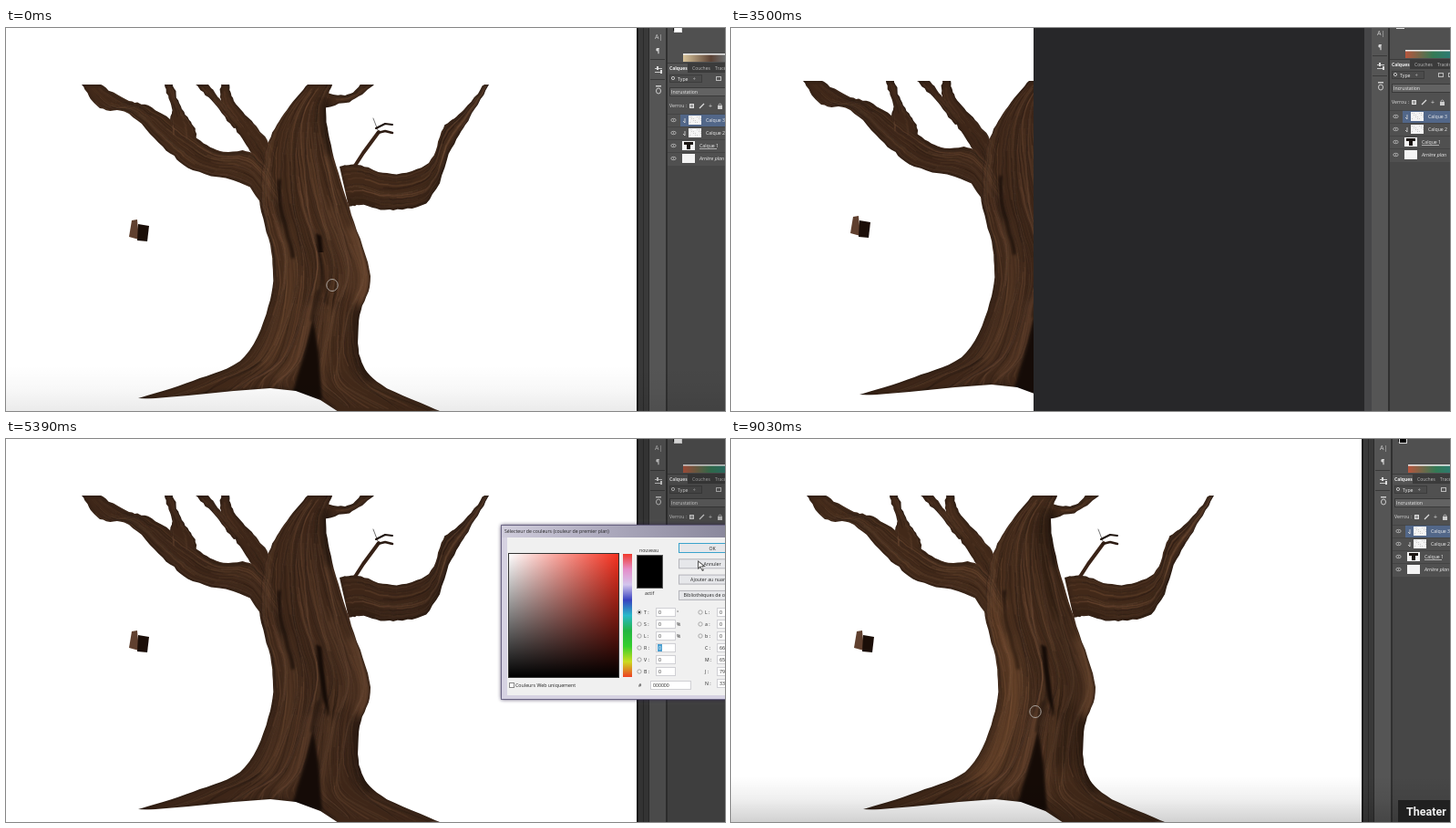
Recreate the animation shown at these times as an HTML page with a canvas. Size 789x420 px, loop 9100 ms.

```html
<!DOCTYPE html>
<html lang="fr">
<head>
<meta charset="utf-8">
<title>Peinture d'un arbre</title>
<style>
html, body { margin: 0; width: 100%; height: 100%; overflow: hidden; background: #fff; }
canvas { display: block; width: 789px; height: 420px; }
</style>
</head>
<body>
<canvas id="stage" width="789" height="420"></canvas>
<script>
const W = 789, H = 420, LOOP = 9100, STEP = 70;
const ctx = document.getElementById('stage').getContext('2d');

const layer = () => {
  const c = document.createElement('canvas');
  c.width = W; c.height = H;
  return c.getContext('2d');
};
const lerp = (a, b, k) => a + (b - a) * k;
const ramp = (t, a, b) => Math.min(1, Math.max(0, (t - a) / (b - a)));
const pairs = s => s.split(' ').map(p => p.split(',').map(Number));

let seed = 11;
const rnd = () => {
  seed = (seed * 16807) % 2147483647;
  return seed / 2147483647;
};

// Smooth curve through key points, with a slightly rough bark edge.
function edge(s, rough = 1.1) {
  const p = pairs(s), last = p.length - 1, out = [], n = 8;
  for (let i = 0; i < last; i++) {
    const q = [p[Math.max(0, i - 1)], p[i], p[i + 1], p[Math.min(last, i + 2)]];
    for (let j = 0; j < n; j++) {
      const u = j / n;
      const jitter = i + j && j % 2 ? rough : 0;
      out.push([0, 1].map(d => {
        const [a, b, c, e] = q.map(v => v[d]);
        const v = b + 0.5 * u * (c - a + u * (2 * a - 5 * b + 4 * c - e + u * (3 * (b - c) + e - a)));
        return v + (rnd() - 0.5) * 2 * jitter;
      }));
    }
  }
  return [...out, p[last]];
}

// A limb lies between two edges.
const limb = (a, b, rough) => ({ a: edge(a, rough), b: edge(b, rough) });

const trunk = limb(
  '331,62 305,94 287,130 278,187 291,245 290,298 262,360 205,387 145,406',
  '358,62 351,88 358,135 379,205 400,272 388,315 389,362 412,391 476,420', 0.6);
const leftArm = limb(
  '104,62 135,80 160,87 205,118 235,135 273,139 305,185',
  '83,62 103,88 135,94 172,130 205,156 262,172 287,205');
const rightArm = limb(
  '366,152 385,150 424,160 464,148 480,110 500,92 525,62',
  '376,196 390,194 425,200 465,188 489,132 509,98 530,62');
const twigs = [
  limb('183,62 192,86 206,108 210,125', '174,62 182,88 180,100 182,116'),
  limb('222,62 240,84 262,108', '208,62 228,82 250,110'),
  limb('245,62 250,80 272,105 290,128 298,150', '236,62 236,82 252,110 270,138 280,155'),
  limb('404,62 380,79 345,89', '390,62 372,74 340,68')
];

function line(g, pts, color, width, alpha = 1) {
  g.globalAlpha = alpha;
  g.strokeStyle = color;
  g.lineWidth = width;
  g.beginPath();
  pts.forEach(p => g.lineTo(...p));
  g.stroke();
  g.globalAlpha = 1;
}

function poly(g, pts, color) {
  g.fillStyle = color;
  g.beginPath();
  (typeof pts === 'string' ? pairs(pts) : pts).forEach(p => g.lineTo(...p));
  g.closePath();
  g.fill();
}

const fillLimb = (g, { a, b }) => poly(g, [...a, ...[...b].reverse()], '#422919');

// Stroke along a limb at share u of its width, from one share of its length to another.
function seam(g, { a, b }, u, from, to, color, width, alpha, drift = 0) {
  const n = a.length - 1, pts = [];
  for (let j = Math.floor(from * n); j <= Math.min(1, to) * n; j++) {
    const k = u + drift * Math.sin(j * 0.3 + u * 40);
    pts.push([lerp(a[j][0], b[j][0], k), lerp(a[j][1], b[j][1], k)]);
  }
  line(g, pts, color, width, alpha);
}

function grain(g, target, count) {
  const tones = ['#1a0e07', '#7b5034', '#2b190f', '#64412a'];
  for (let i = 0; i < count; i++) {
    const from = rnd() * 0.85;
    seam(g, target, rnd(), from, from + 0.12 + rnd() * 0.4, tones[i % 4],
      0.5 + rnd() * 1.3, 0.08 + rnd() * 0.22, rnd() * 0.03);
  }
}

function soft(g, blur, draw) {
  g.filter = `blur(${blur}px)`;
  draw();
  g.filter = 'none';
}

function paintTree() {
  const g = layer();
  g.lineCap = g.lineJoin = 'round';
  const limbs = [leftArm, rightArm, ...twigs, trunk];
  limbs.forEach(l => fillLimb(g, l));
  poly(g, '300,405 365,421 476,420', '#422919');
  g.globalCompositeOperation = 'destination-out';
  poly(g, '140,408 200,403 250,398 290,395 318,398 345,408 365,421 140,421', '#000');

  const hole = layer();
  hole.fillRect(0, 0, W, H);
  hole.globalCompositeOperation = 'destination-out';
  hole.drawImage(g.canvas, 0, 0);

  g.globalCompositeOperation = 'source-atop';
  limbs.forEach(l => grain(g, l, l === trunk ? 420 : twigs.includes(l) ? 30 : 120));

  const dark = '#150b06', light = '#82573b';
  soft(g, 4, () => {
    seam(g, trunk, 0.96, 0.1, 0.26, dark, 9, 0.65);
    seam(g, trunk, 0.97, 0.62, 0.85, dark, 9, 0.6);
    seam(g, trunk, 0.95, 0.42, 0.58, light, 7, 0.7);
    seam(g, trunk, 0.8, 0.38, 0.55, light, 14, 0.22);
    seam(g, trunk, 0.44, 0.64, 0.87, light, 6, 0.55);
    seam(g, trunk, 0.68, 0.64, 0.9, light, 6, 0.45);
    seam(g, trunk, 0.2, 0.45, 0.78, light, 12, 0.25);
    seam(g, rightArm, 0.85, 0, 0.6, dark, 8, 0.4);
  });
  soft(g, 1.5, () => {
    seam(g, trunk, 0.22, 0.33, 0.5, dark, 4, 0.8);
    poly(g, '337,320 343,355 347,408 314,401 328,355', dark);
    seam(g, trunk, 0.49, 0.58, 0.66, dark, 3, 0.6);
  });
  g.globalAlpha = 0.5;
  soft(g, 2.5, () => g.drawImage(hole.canvas, 0, 0));
  g.globalAlpha = 1;

  g.globalCompositeOperation = 'source-over';
  line(g, pairs('383,151 392,137 409,114'), '#3a2317', 4);
  line(g, pairs('408,115 416,113 424,115'), '#2c1b12', 2.5);
  line(g, pairs('408,112 403,99'), '#777', 1);
  line(g, pairs('406,110 416,105 424,106'), '#20150f', 2);
  return g.canvas;
}

const tree = paintTree();
const work = layer();

function drawTree(t) {
  const g = work;
  g.globalCompositeOperation = 'source-over';
  g.clearRect(0, 0, W, H);
  g.drawImage(tree, 0, 0);
  g.globalCompositeOperation = 'source-atop';
  const dim = 0.1 * ramp(t, 1750, 2660) * (1 - ramp(t, 6440, 6720));
  g.fillStyle = `rgba(20,12,9,${dim})`;
  g.fillRect(0, 0, W, H);

  const glow = ramp(t, 6440, 6790), shade = ramp(t, 7420, 8330);
  if (glow) soft(g, 7, () => seam(g, trunk, 0.15, 0.35, 0.8, '#8a5836', 17, 0.33 * glow));
  if (shade) soft(g, 8, () => seam(g, trunk, 0.8, 0.1, 0.75, '#160b05', 24, 0.3 * shade));

  // The knothole is painted downwards.
  g.save();
  g.beginPath();
  g.rect(330, 220, 40, lerp(26, 90, ramp(t, 70, 1400)));
  g.clip();
  soft(g, 1, () => poly(g, '340,225 346,228 355,304 348,285', '#150b06'));
  g.restore();
  soft(g, 1.5, () => line(g, pairs('344,245 353,304'), '#150b06', 3, 0.4));
  ctx.drawImage(g.canvas, 0, 0);
}

function rect(x, y, w, h, color) {
  ctx.fillStyle = color;
  ctx.fillRect(x, y, w, h);
}

function box(x, y, w, h, fill, border) {
  rect(x, y, w, h, border);
  rect(x + 1, y + 1, w - 2, h - 2, fill);
}

function text(s, x, y, color = '#222', size = 5.2, style = '') {
  ctx.font = `${style} ${size}px "Open Sans", sans-serif`;
  ctx.fillStyle = color;
  ctx.fillText(s, x, y);
}

function ring(x, y, rx, ry, color, width = 0.8) {
  ctx.strokeStyle = color;
  ctx.lineWidth = width;
  ctx.beginPath();
  ctx.ellipse(x, y, rx, ry, 0, 0, Math.PI * 2);
  ctx.stroke();
}

function fade(x, y, w, h, stops, down) {
  const f = ctx.createLinearGradient(x, y, down ? x : x + w, down ? y + h : y);
  stops.forEach((c, i) => f.addColorStop(i / (stops.length - 1), c));
  rect(x, y, w, h, f);
}

function swatches() {
  poly(ctx, '138,211 144,210 146,232 135,229', '#60402f');
  poly(ctx, '145,215 157,217 155,234 144,233', '#1b0e08');
}

function layerRow(y, name, kind) {
  const inset = kind === 'clip' ? 7 : 0, x = 17 + inset;
  ring(7.5, y, 2.7, 1.7, '#ccc', 0.7);
  rect(7, y - 0.5, 1, 1, '#ddd');
  rect(x, y - 5, 14, 10, '#f4f4f4');
  if (inset) {
    line(ctx, [[20, y - 2], [20, y + 3], [18, y + 1]], '#ddd', 0.8);
    for (let i = 0; i < 14; i++) rect(x + 1 + i % 7 * 2, y - 4 + (i % 4) * 2, 1, 1, '#ccc');
  }
  if (kind === 'tree') {
    rect(x + 2, y - 4, 10, 3, '#1a1512');
    rect(x + 5, y - 2, 4, 6, '#1a1512');
    rect(x + 19, y + 3, 19, 0.6, '#eee');
  }
  text(name, x + 19, y + 2, '#f0f0f0', 5.2, kind === 'back' ? 'italic' : '');
}

function toolStrip() {
  text('A|', -13, 12, '#ccc', 7);
  text('¶', -12, 27, '#ddd', 7, 'bold');
  for (let i = 0; i < 2; i++) {
    rect(-18, 34 + i * 22, 16, 0.8, '#333');
    rect(-13, 44 + i * 4, 8, 1, '#ccc');
    rect(-11 + i * 4, 42 + i * 4, 2, 4, '#ddd');
  }
  ring(-9, 69, 2.5, 3, '#ccc', 1);
  rect(-12, 63, 6, 1.5, '#ccc');
}

function dock(x, y, t) {
  ctx.save();
  ctx.translate(x, 0);
  rect(-19, 0, 18, H, '#555');
  rect(-1, 0, 2, H, '#303030');
  rect(1, 0, 121, H, '#474747');
  ctx.translate(0, y);
  toolStrip();

  rect(1, -4, 121, 42, '#505050');
  rect(7, -2, 5, 5, '#111');
  box(8, -3, 9, 8, t < 6230 ? '#fff' : '#000', '#ddd');
  fade(18, 29, 92, 8, t < 980 ? ['#d9c49a', '#5c4336', '#7d9aa8', '#b15b44'] : ['#b8553d', '#347a55', '#267a86', '#c0675b']);
  rect(18, 28, 92, 1.5, '#eee');
  rect(1, 38, 121, 11, '#3b3b3b');
  rect(1, 39, 22, 10, '#535353');
  ['Calques', 'Couches', 'Tracés'].forEach((s, i) =>
    text(s, 3 + i * 25, 46, i ? '#bbb' : '#f2f2f2', 5, i ? '' : 'bold'));

  rect(1, 49, 121, 102, '#505050');
  box(3, 51, 36, 9, '#4b4b4b', '#3d3d3d');
  ring(7, 55, 1.6, 1.6, '#ddd');
  text('Type    ÷', 12, 57.5, '#eee');
  for (let i = 0; i < 5; i++) box(54 + i * 11, 53, 6, 5, '#555', '#bbb');
  box(3, 65, 71, 10, '#626262', '#3a3a3a');
  text('Incrustation', 5, 72, '#f0f0f0');
  text('Verrou :', 3, 87, '#ddd');
  ['Opacité :', 'Fond :'].forEach((s, i) => {
    const v = 65 + i * 15;
    text(s, 77 + i * 5, v + 7, '#ddd');
    box(97, v, 16, 9, '#393939', '#2d2d2d');
    text('100 %', 99, v + 6.5, '#eee', 4.8);
    box(114, v, 7, 9, '#606060', '#3a3a3a');
  });
  box(25, 83, 5, 5, '#999', '#ddd');
  line(ctx, [[36, 88], [41, 83]], '#ddd', 1.2);
  text('+', 46, 88, '#ddd', 7);
  rect(56, 85, 5, 4, '#ccc');
  ring(58.5, 85, 1.5, 2, '#ccc');

  rect(15, 94, 107, 14, '#526789');
  ['Calque 3', 'Calque 2', 'Calque 1', 'Arrière plan'].forEach((s, i) => {
    rect(1, 94 + i * 14, 121, 0.8, '#414141');
    layerRow(101 + i * 14, s, ['clip', 'clip', 'tree', 'back'][i]);
  });
  box(109, 140, 5, 5, '#777', '#bbb');
  ctx.restore();
}

function rails() {
  rect(692, 0, 14, H, '#393939');
  rect(692, 0, 2, H, '#1c1c1c');
  rect(699, 0, 1, H, '#2a2a2a');
  rect(705, 0, 1, H, '#2a2a2a');
}

function paper(t) {
  rect(0, 0, W, H, '#fff');
  drawTree(t);
  swatches();
}

function field(label, value, x, y, width, selected) {
  text(label, x, y + 2);
  box(x + 13, y - 5, width, 10, '#fff', '#d0d0d4');
  if (selected) rect(x + 15, y - 4, 5, 8, '#4b9fd0');
  text(value, x + 16, y + 2, selected ? '#fff' : '#222');
}

function dialog() {
  rect(692, 0, 97, H, 'rgba(25,25,25,.18)');
  ctx.save();
  ctx.shadowColor = 'rgba(40,30,70,.5)';
  ctx.shadowBlur = 4;
  box(543, 94, 260, 192, '#d6d2e2', '#77728f');
  ctx.restore();
  fade(544, 95, 245, 13, ['#d0cddc', '#aaa7bb', '#8a889c']);
  text('Sélecteur de couleurs (couleur de premier plan)', 547, 103);
  rect(550, 108, 239, 173, '#f0f0f0');

  rect(551, 125, 122, 137, '#333');
  fade(552, 126, 120, 135, ['#fff', '#f5301e']);
  fade(552, 126, 120, 135, ['rgba(0,0,0,0)', '#000'], true);
  fade(677, 126, 10, 135, ['#f03a2c', '#e58dc9', '#d3c5ed', '#3842c0', '#28b9c9', '#23b542', '#34cf2d', '#cbdc20', '#ee3f24'], true);
  text('nouveau', 695, 124);
  box(692, 127, 29, 37, '#000', '#555');
  text('actif', 701, 171);

  ['OK', 'Annuler', 'Ajouter au nuancier', 'Bibliothèques de couleurs'].forEach((s, i) => {
    const y = 114 + i * 17.3;
    box(738, y, 74, 11, '#e6e7ea', i ? '#b4b4ba' : '#3aa3cc');
    ctx.textAlign = 'center';
    text(s, 775, y + 7.5);
    ctx.textAlign = 'left';
  });
  for (let i = 0; i < 6; i++) {
    const y = 190 + i * 13;
    ring(695, y, 2.2, 2.2, '#999');
    field('TSLRVB'[i] + ' :', '0', 700, y, 22, i === 3);
    if (i < 3) {
      text('°%%'[i], 736, y + 2);
      ring(762, y, 2.2, 2.2, '#999');
    }
    field('LabCMJ'[i] + ' :', i < 3 ? '0' : ['66', '65', '79'][i - 3], 767, y, 22);
  }
  rect(694, 189, 2, 2, '#222');
  field('N :', '33', 767, 268, 22);
  box(552, 267, 6, 6, '#fff', '#888');
  text('Couleurs Web uniquement', 559, 272, '#222', 5.3);
  field('#', '000000', 694, 270, 45);
}

function arrow(t) {
  const k = ramp(t, 4620, 5390);
  ctx.save();
  ctx.translate(lerp(737, 760, k) - 180 * Math.sin(k * Math.PI), lerp(8, 134, k));
  poly(ctx, '-1,-1 -1,9 2,7 4,11 6,10 4,6 8,6', '#555');
  poly(ctx, '0,1 0,7 2,5 4,9 5,9 3,5 5,5', '#fff');
  ctx.restore();
}

function brush(t) {
  let x, y;
  if (t < 4620) {
    const s = t < 1750 ? Math.min(t, 1400) : t - 350;
    const k = ramp(t, 2660, 3080);
    x = lerp(346 + 12 * Math.cos(s / 200), 252, k);
    y = lerp(282 + 45 * Math.sin(s / 180), 172, k);
  } else {
    const k = ramp(t, 6790, 9030);
    x = lerp(266, 334, k) + 35 * Math.sin(k * Math.PI * 6);
    y = lerp(254, 299, k) + 50 * Math.sin(k * Math.PI * 9);
  }
  ring(x, y, 6.2, 6.5, '#aaa39d', 1);
}

function shiftedView(t) {
  rect(0, 0, W, H, '#fff');
  ctx.save();
  ctx.translate(-4, -4);
  paper(t);
  ctx.restore();
  rect(0, 416, 332, 4, '#fff');
  rect(332, 0, 363, H, '#272729');
  rect(695, 0, 8, H, '#464648');
  dock(722, -4, t);
}

function doubledView(t) {
  paper(t);
  rect(187, 0, W - 187, H, '#555');
  dock(205, 2, t);
  rect(186, 0, 2, H, '#3c3c3c');
  rect(327, 0, 18, H, '#484848');
  rect(327, 0, 5, H, '#343434');
  rect(335, 40, 8, 380, '#3b3b3b');
  dock(725, 0, t);
}

function controls(t) {
  const a = t < 4000 ? 0.08 * (1 - ramp(t, 280, 980)) : 0.18 * ramp(t, 8330, 8750);
  if (a) fade(0, 370, W, 50, ['rgba(0,0,0,0)', `rgba(0,0,0,${a * 0.35})`, `rgba(0,0,0,${a})`], true);
  if (t >= 8750) {
    rect(732, 396, 57, 24, '#202020');
    ctx.font = 'bold 12.5px Roboto, sans-serif';
    ctx.fillStyle = '#eee';
    ctx.fillText('Theater', 741, 412.5);
  }
}

function draw(t) {
  if (t >= 3500 && t < 3920) return shiftedView(t);
  if (t >= 3920 && t < 4200) return doubledView(t);
  paper(t);
  rails();
  dock(725, 0, t);
  if (t >= 4760 && t < 6230) dialog();
  if (t >= 4620 && t < 6230) arrow(t);
  else brush(t);
  controls(t);
}

const start = performance.now();
function loop() {
  const now = (performance.now() - start) % LOOP;
  draw(Math.floor(now / STEP) * STEP);
  requestAnimationFrame(loop);
}
loop();
</script>
</body>
</html>
```
